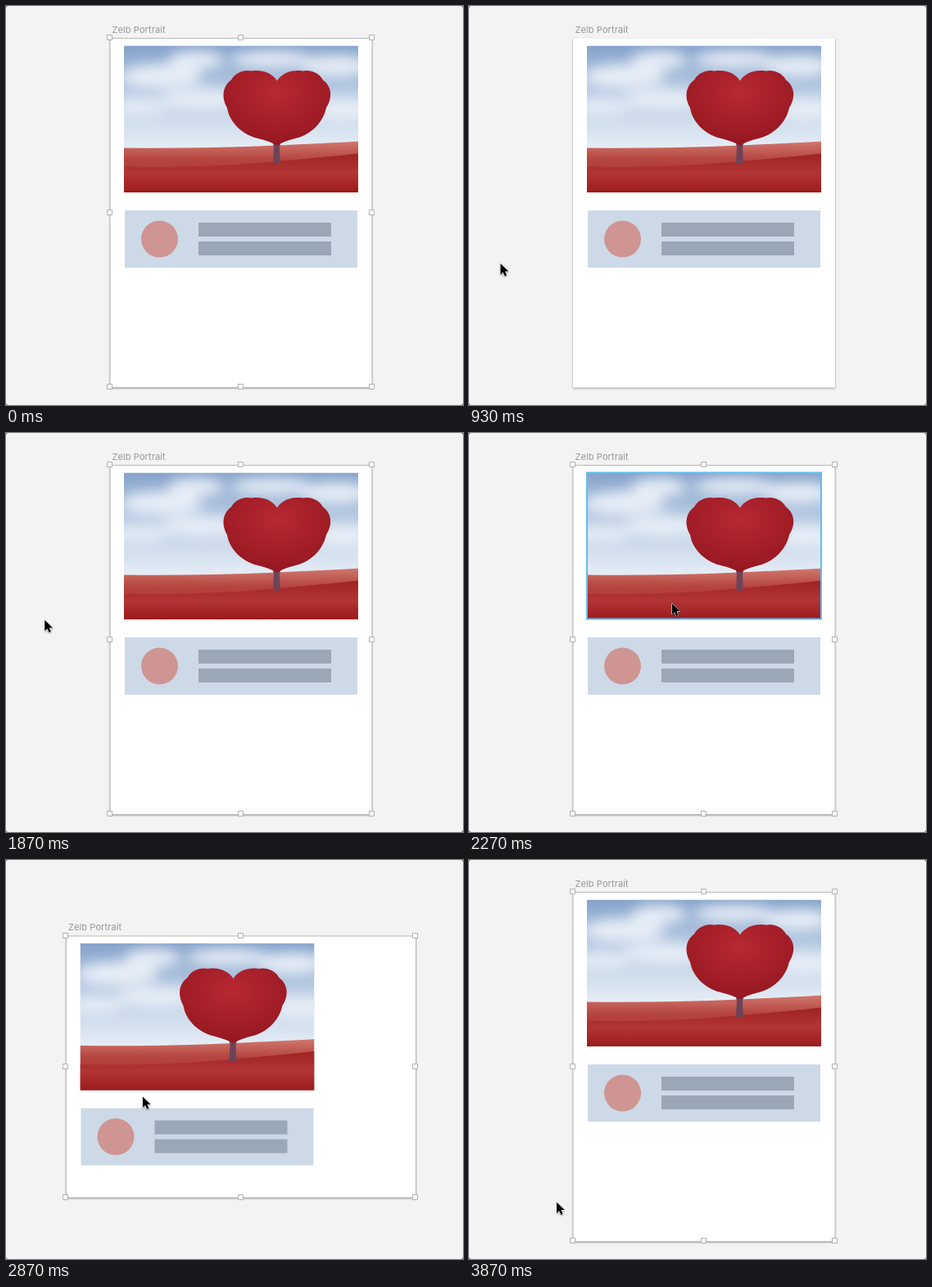
These frames come from a looping animation (558x488 px, 3930 ms). An HTML page:

```html
<!DOCTYPE html>
<html>
<head>
<meta charset="utf-8">
<style>
html, body { margin: 0; width: 100%; height: 100%; overflow: hidden; background: #f3f3f3; }
svg { display: block; }
text { font: 11px Inter, Roboto, sans-serif; letter-spacing: .1px; fill: #979797; }
</style>
</head>
<body>
<svg width="558" height="488" viewBox="0 0 558 488">
  <defs>
    <linearGradient id="sky" x2="0" y2="1">
      <stop offset="0" stop-color="#86a3cb"/>
      <stop offset=".3" stop-color="#b4c8e1"/>
      <stop offset=".68" stop-color="#e4ecf5"/>
    </linearGradient>
    <linearGradient id="hill" x2="0" y2="1">
      <stop offset="0" stop-color="#d0786f"/>
      <stop offset=".35" stop-color="#b5453f"/>
      <stop offset="1" stop-color="#a82a28"/>
    </linearGradient>
    <linearGradient id="field" x2="0" y2="1">
      <stop offset="0" stop-color="#a02324"/>
      <stop offset=".5" stop-color="#b23536"/>
      <stop offset="1" stop-color="#9c1a1c"/>
    </linearGradient>
    <radialGradient id="crown" cx=".5" cy=".3" r=".75">
      <stop offset="0" stop-color="#b82832"/>
      <stop offset="1" stop-color="#92161f"/>
    </radialGradient>
    <filter id="soft" x="-30%" y="-30%" width="160%" height="160%"><feGaussianBlur stdDeviation="8"/></filter>
    <filter id="shadow"><feDropShadow dx="0" dy="1" stdDeviation="1.2" flood-opacity=".45"/></filter>
    <clipPath id="crop"><path d="M0 0H286V179.5H0z"/></clipPath>
  </defs>

  <rect id="board" fill="#fff" filter="url(#shadow)"/>
  <g id="content">
    <text x="129.5" y="32.5">Zelb Portrait</text>
    <g transform="translate(144 48.5)">
      <g clip-path="url(#crop)">
        <path d="M0 0H286V180H0z" fill="url(#sky)"/>
        <g fill="#e6edf6" filter="url(#soft)">
          <ellipse cx="45" cy="38" rx="50" ry="15"/>
          <ellipse cx="88" cy="18" rx="34" ry="11"/>
          <ellipse cx="95" cy="66" rx="50" ry="13"/>
          <ellipse cx="18" cy="75" rx="35" ry="10"/>
          <ellipse cx="180" cy="17" rx="50" ry="10"/>
          <ellipse cx="258" cy="25" rx="42" ry="13"/>
          <ellipse cx="268" cy="78" rx="36" ry="14"/>
        </g>
        <path d="M0 125Q100 126 187 122T286 117V180H0z" fill="url(#hill)"/>
        <path d="M0 148Q90 150 170 143T286 132V180H0z" fill="url(#field)"/>
        <path d="M172 107Q182 115 183 124L182 144H191L190 124Q192 114 203 106L187 112z" fill="#6d4358"/>
        <path d="M187 43C181 33 168 29 156 31C146 29 136 33 131 42C120 50 119 64 126 76C129 95 146 109 162 113Q178 117 187 122Q195 117 211 113C227 109 243 95 247 76C255 64 254 50 243 42C238 33 228 29 218 31C206 29 193 33 187 43z"
          fill="url(#crown)"/>
      </g>
      <rect id="photoHover" width="286" height="179" fill="none" stroke="#62bdf0" stroke-width="2"/>
    </g>
    <path d="M145 250H429V320H145z" fill="#cdd9e7"/>
    <circle cx="187.5" cy="285" r="22.5" fill="#cf9593"/>
    <path d="M235 265H397V282H235zM235 288H397V305H235z" fill="#9aa7b7"/>
  </g>
  <rect id="boardHover" fill="none" stroke="#62bdf0" stroke-width="2.5"/>
  <g id="selection" fill="#fff" stroke="#bdbdbd">
    <rect id="frame" fill="none"/>
    <path id="handles" stroke="#b0b0b0"/>
  </g>
  <path id="cursor" d="M0 0V13.4L3.1 10.5L5.3 15.4L7.6 14.4L5.5 9.6H9.8z" stroke="#fff" paint-order="stroke" filter="url(#shadow)"/>
  <path d="M0 0H2L0 2zM558 0V2L556 0zM0 488V486L2 488zM558 488H556L558 486z" fill="#777"/>
</svg>
<script>
const LOOP = 3930;
const $ = id => document.getElementById(id);

// time, x, y
const track = [
  [0, 1, 500], [70, 2, 492], [530, 17, 400], [800, 38.5, 315], [1130, 38.5, 315],
  [1350, -16, 250], [1750, -16, 235], [2130, 248, 208.5], [2700, 248, 208.5],
  [3130, 15.5, 440.5], [3400, 15.5, 440.5], [3740, 107, 418.5], [LOOP, 107, 418.5]
];

function cursorAt(t) {
  const i = track.findIndex(p => p[0] > t);
  const [t0, x0, y0] = track[i - 1], [t1, x1, y1] = track[i];
  const u = (t - t0) / (t1 - t0), e = u * u * (3 - 2 * u);
  return [x0 + (x1 - x0) * e, y0 + (y1 - y0) * e];
}

function setRect(id, x, y, width, height) {
  for (const [k, v] of Object.entries({ x, y, width, height })) $(id).setAttribute(k, v);
}

function show(id, on) {
  $(id).style.display = on ? "" : "none";
}

function handlePath(x, y, w, h) {
  let d = "";
  for (const i of [0, 1, 2])
    for (const j of [0, 1, 2])
      if (i !== 1 || j !== 1)
        d += `M${Math.floor(x + w * i / 2) - 3.5} ${Math.floor(y + h * j / 2) - 3.5}h6v6h-6z`;
  return d;
}

function draw(now) {
  const t = now % LOOP;
  const wide = t >= 2400 && t < 3800;
  const selected = t < 870 || t >= 1670;
  const box = wide ? [73.5, 93, 427, 320] : [127, 39.5, 320, 427];
  const shift = wide ? 53.5 : 0;
  const [x, y] = cursorAt(t);
  const px = x + shift - 144, py = y - shift - 48.5;

  for (const id of ["board", "boardHover", "frame"]) setRect(id, ...box);
  $("handles").setAttribute("d", handlePath(...box));
  $("content").setAttribute("transform", `translate(${-shift} ${shift})`);
  $("cursor").setAttribute("transform", `translate(${x} ${y})`);
  show("selection", selected);
  show("boardHover", t >= 1400 && t < 1670);
  show("photoHover", selected && px > 0 && px < 286 && py > 0 && py < 179);
  requestAnimationFrame(draw);
}
draw(0);
</script>
</body>
</html>
```
